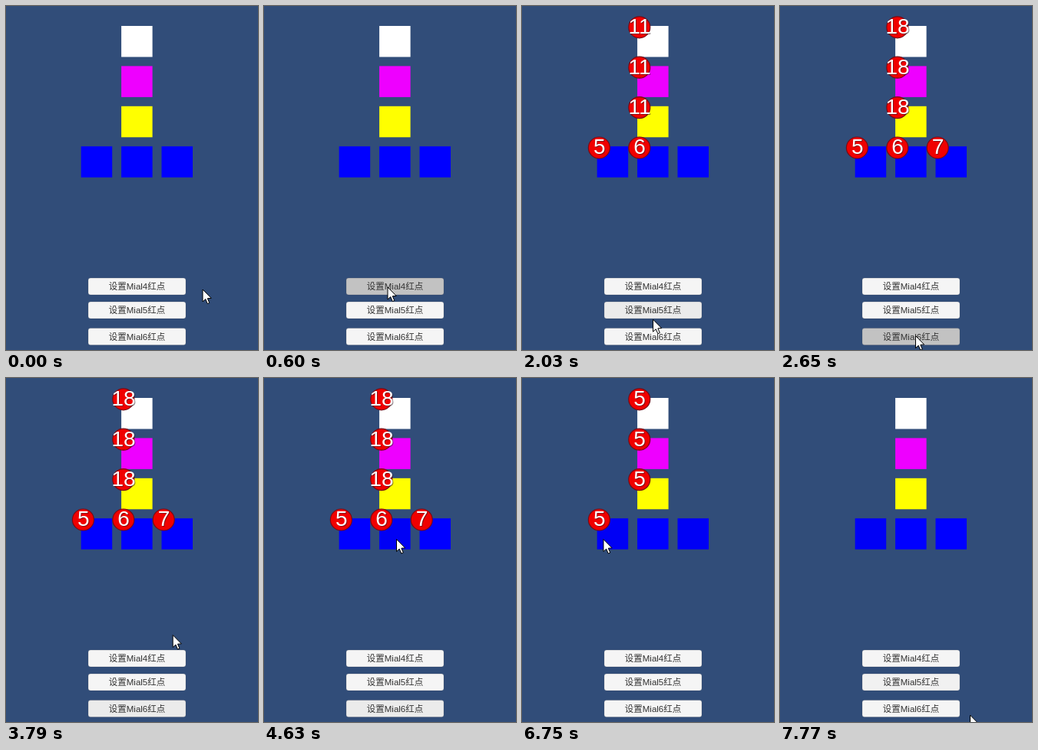
An HTML page with a canvas that plays this animation: 328 px wide and 449 px high, repeating every 7.84 s.

```html
<!DOCTYPE html>
<html lang="zh">
<head>
<meta charset="utf-8">
<style>
html, body { margin: 0; width: 100%; height: 100%; overflow: hidden; background: #314d79; }
canvas { display: block; width: 328px; height: 449px; }
</style>
</head>
<body>
<canvas id="stage"></canvas>
<script>
const W = 328, H = 449, LOOP = 7840;
const FADE = 90, HOLD = 140;
const HOVER = 0.96, PRESS = 0.79;
const SIZE = 40.5, PITCH = 52.4;
const canvas = document.getElementById('stage');
const ctx = canvas.getContext('2d');
const dpr = window.devicePixelRatio || 1;
canvas.width = W * dpr;
canvas.height = H * dpr;

const square = (col, row, color) => (
  { x: 97.7 + PITCH * col, y: 26 + PITCH * row, w: SIZE, h: SIZE, color });
const parents = ['#ffffff', '#ee00ff', '#ffff00'].map((color, row) => square(1, row, color));
const leaves = [0, 1, 2].map(col => ({ ...square(col, 3), count: 5 + col }));
const buttons = [355, 386, 420.5].map((y, i) => (
  { x: 107, y, w: 127, h: 22, label: `设置Mial${4 + i}红点` }));

// Pointer moves: when, where to, optional curve control, optional press on an item
const HOME = [256, 370];
const moves = [
  { from: 40, until: 210, to: [161, 367], press: 470, item: buttons[0] },
  { from: 880, until: 1290, to: [169, 403.5], press: 1420, item: buttons[1] },
  { from: 1960, until: 2300, to: [176.5, 430.5], press: 2510, item: buttons[2] },
  { from: 2980, until: 3530, to: [253, 355] },
  { from: 3720, until: 4600, to: [172.5, 210.5], bend: [15, 230], press: 4760, item: leaves[1] },
  { from: 5300, until: 5660, to: [216, 209], bend: [194, 205], press: 5650, item: leaves[2] },
  { from: 6060, until: 6660, to: [106, 210.5], bend: [40, 250], press: 6820, item: leaves[0] },
  { from: 7430, until: 7770, to: [247.5, 440] }
];

const clamp = v => Math.max(0, Math.min(1, v));
const releaseOf = item => moves.find(m => m.item === item).press + HOLD;

function pointerAt(t) {
  let pos = HOME;
  for (const { from, until, to, bend } of moves) {
    if (t < from) break;
    const k = clamp((t - from) / (until - from)), start = pos;
    pos = to.map((end, i) => {
      const mid = bend ? bend[i] : (start[i] + end) / 2;
      return (1 - k) ** 2 * start[i] + 2 * k * (1 - k) * mid + k * k * end;
    });
  }
  return pos;
}

function levelAt(item, t) {
  const last = moves.filter(m => m.item && m.press <= t).pop();
  if (last && last.item === item) return t < last.press + HOLD ? PRESS : HOVER;
  const [x, y] = pointerAt(t);
  const inside = x > item.x && x < item.x + item.w && y > item.y && y < item.y + item.h;
  return inside ? HOVER : 1;
}

// Averaging the recent levels gives a linear fade
function tint(item, t) {
  const samples = 8;
  let sum = 0;
  for (let i = 0; i < samples; i++) sum += levelAt(item, t - FADE * (i + 0.5) / samples);
  return sum / samples;
}

function drawSquare(s, color) {
  ctx.fillStyle = color;
  ctx.fillRect(s.x, s.y, s.w, s.h);
}

function drawButton(b, t) {
  const v = Math.round(245 * tint(b, t));
  ctx.beginPath();
  ctx.roundRect(b.x, b.y, b.w, b.h, 3);
  ctx.fillStyle = `rgb(${v},${v},${v})`;
  ctx.fill();
  ctx.lineWidth = 1;
  ctx.strokeStyle = 'rgba(60,65,80,0.25)';
  ctx.stroke();
  ctx.fillStyle = '#323232';
  ctx.font = '11.5px "Liberation Sans", "Noto Sans CJK SC", "Noto Sans CJK", sans-serif';
  ctx.fillText(b.label, 170.5, b.y + 15.2);
}

function drawBadge(s, count) {
  const x = s.x + 2.7, y = s.y + 1.8;
  ctx.beginPath();
  ctx.arc(x, y, 14, 0, Math.PI * 2);
  ctx.fillStyle = '#f00000';
  ctx.fill();
  ctx.lineWidth = 1.2;
  ctx.strokeStyle = '#780a14';
  ctx.stroke();
  ctx.font = '28px "Liberation Sans", Arial, sans-serif';
  ctx.fillStyle = 'rgba(40,20,30,0.5)';
  ctx.fillText(count, x + 1.3, y + 9.4);
  ctx.fillStyle = '#fff';
  ctx.fillText(count, x + 0.3, y + 8.4);
}

function drawPointer([x, y]) {
  const outline = [[0, 0], [0, 16], [3.7, 12.6], [6.3, 18.6], [8.8, 17.5], [6.3, 11.7], [11.2, 11.4]];
  ctx.beginPath();
  outline.forEach(([dx, dy]) => ctx.lineTo(x + dx, y + dy));
  ctx.closePath();
  ctx.fillStyle = '#fff';
  ctx.fill();
  ctx.lineWidth = 1;
  ctx.strokeStyle = '#000';
  ctx.stroke();
}

function draw(t) {
  ctx.setTransform(dpr, 0, 0, dpr, 0, 0);
  ctx.textAlign = 'center';
  ctx.fillStyle = '#314d79';
  ctx.fillRect(0, 0, W, H);

  parents.forEach(p => drawSquare(p, p.color));
  leaves.forEach(l => drawSquare(l, `rgb(0,0,${Math.round(255 * tint(l, t))})`));
  buttons.forEach(b => drawButton(b, t));

  // A button sets its leaf's count, clicking the leaf clears it
  const active = leaves.filter((l, i) => t >= releaseOf(buttons[i]) && t < releaseOf(l));
  const total = active.reduce((sum, l) => sum + l.count, 0);
  if (total) parents.forEach(p => drawBadge(p, total));
  active.forEach(l => drawBadge(l, l.count));

  drawPointer(pointerAt(t));
}

const start = performance.now();
function tick() {
  draw((performance.now() - start) % LOOP);
  requestAnimationFrame(tick);
}
tick();
</script>
</body>
</html>
```
